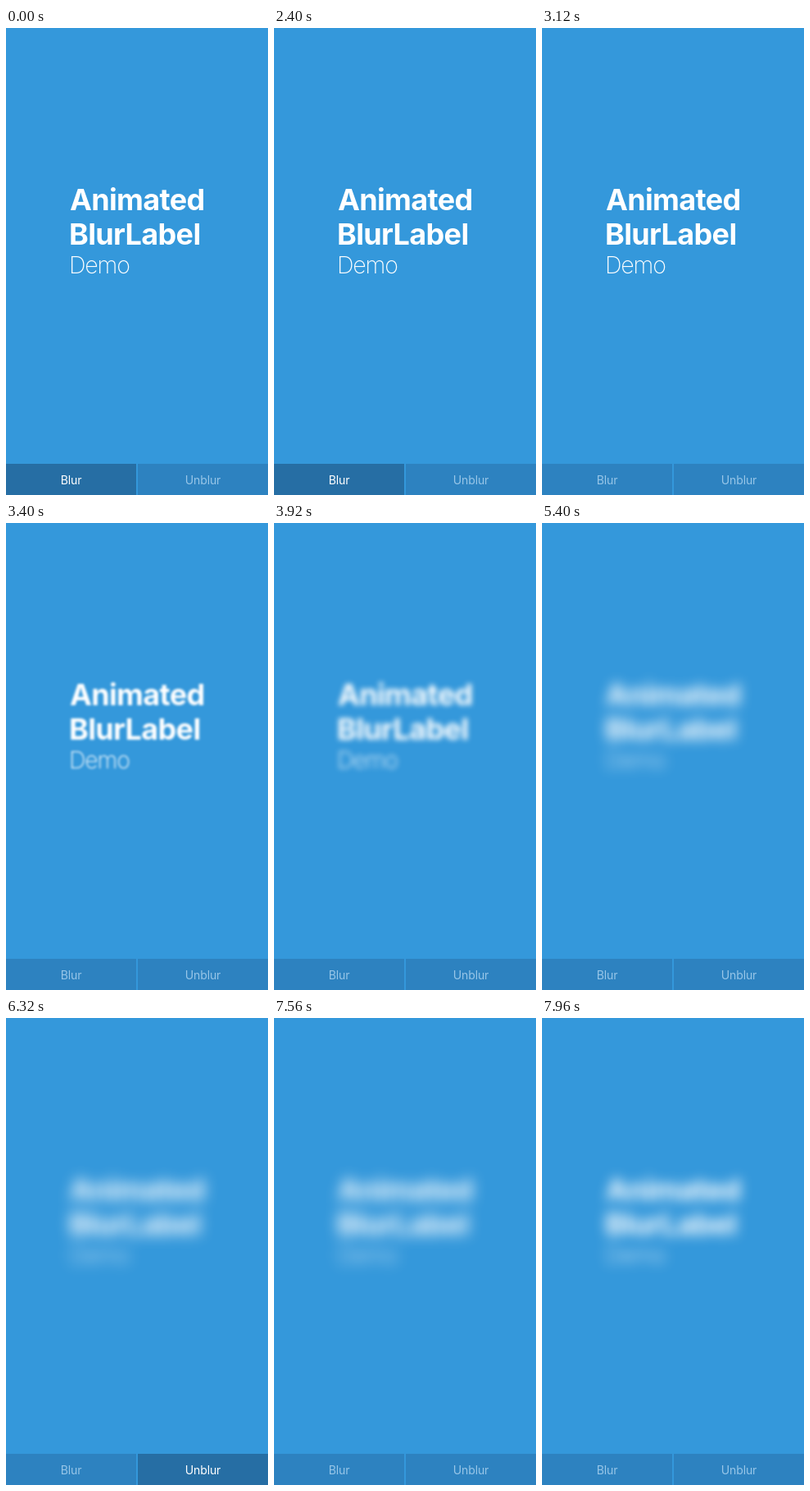
Recreate the animation shown at these times as an HTML page. Size 320x569 px, loop 8000 ms.

```html
<!DOCTYPE html>
<html lang="en">
<head>
<meta charset="utf-8">
<title>Animated BlurLabel</title>
<style>
  html, body { margin: 0; width: 100%; height: 100%; overflow: hidden; background: #3498db; }
  svg { display: block; width: 100%; height: 100%; }
  text { font-family: Inter, "Liberation Sans", sans-serif; fill: #fff; }
  .title { font-size: 36px; font-weight: 700; letter-spacing: -.65px; }
  .sub { font-size: 28.5px; font-weight: 200; letter-spacing: -1.1px; }
  .button text { font-size: 14px; text-anchor: middle; letter-spacing: -.1px; fill: #98c6e8; }
  .button rect { fill: #2d82c0; }
  .button.on rect { fill: #266ea4; }
  .button.on text { fill: #fff; }
</style>
</head>
<body>
<svg viewBox="0 0 320 569">
  <rect width="320" height="569" fill="#3498db"/>
  <g id="label">
    <text class="title" x="78" y="221.5">Animated</text>
    <text class="title" x="77" y="263.5">BlurLabel</text>
    <text class="sub" x="77" y="298.5">Demo</text>
  </g>
  <g id="blur" class="button">
    <rect y="531" width="159" height="38"/>
    <text x="79.5" y="555.5">Blur</text>
  </g>
  <g id="unblur" class="button">
    <rect x="161" y="531" width="159" height="38"/>
    <text x="240.5" y="555.5">Unblur</text>
  </g>
</svg>
<script>
  const LOOP = 8000, BLUR_AT = 2920, UNBLUR_AT = 7560, FADE = 2800, MAX_RADIUS = 8.6;
  const [label, blur, unblur] = ["label", "blur", "unblur"].map(id => document.getElementById(id));
  const progress = (t, start) => Math.min(1, Math.max(0, (t - start) / FADE));

  function draw(t) {
    const amount = progress(t, BLUR_AT) - progress(t, UNBLUR_AT);
    const radius = MAX_RADIUS * Math.pow(amount, 0.92);
    label.style.filter = radius > 0 ? `blur(${radius.toFixed(2)}px)` : "none";
    blur.classList.toggle("on", t < BLUR_AT);
    unblur.classList.toggle("on", t >= BLUR_AT + FADE && t < UNBLUR_AT);
  }

  const begin = performance.now();
  function frame() {
    draw((performance.now() - begin) % LOOP);
    requestAnimationFrame(frame);
  }
  draw(0);
  requestAnimationFrame(frame);
</script>
</body>
</html>
```
